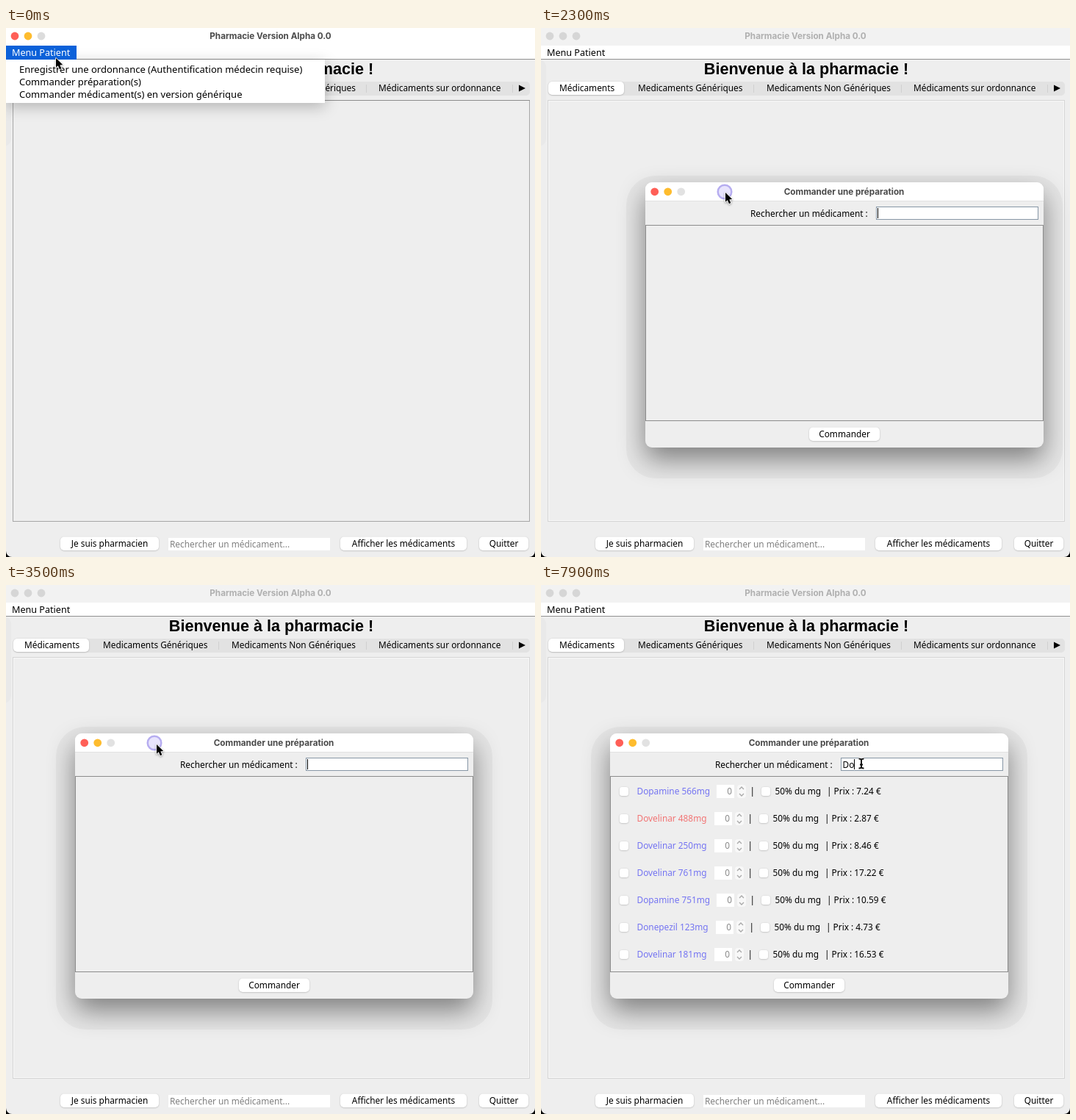
Write an HTML page with a canvas that moves like this. It is 720 by 720 pixels and loops after 8 s.

```html
<!DOCTYPE html>
<html lang="fr">
<head>
<meta charset="utf-8">
<style>
html, body { margin: 0; width: 100%; height: 100%; overflow: hidden; background: #000; }
canvas { display: block; }
</style>
</head>
<body>
<canvas id="stage" width="720" height="720"></canvas>
<script>
const c = document.getElementById('stage').getContext('2d');
const LOOP = 8000, STEP = 100;
const ui = size => `500 ${size}px "Noto Sans", sans-serif`;
const LABEL = ui(11.85), MENU = ui(12.6), ITEM = ui(13), TITLE = 'bold 11.7px Inter, sans-serif';
const BLUE = '#0b61d9', GREY = '#eeeeee';

// Each key is [time, x, y].
const pointerKeys = [[0, 68, 41], [200, 75, 47], [500, 98, 67], [700, 103, 74], [1000, 103, 74],
  [1300, 277, 178], [1700, 414, 224], [1900, 420, 226], [2600, 141, 223], [2800, 144, 222],
  [3500, 205, 217], [3700, 207, 219], [4000, 300, 256], [4300, 405, 268], [4500, 434, 251], [4800, 436, 243]];
const dialogKeys = [[1900, 311, 212], [2600, 32, 208], [2800, 35, 208], [3500, 94, 202]];
const rows = [['Dopamine 566mg', 0, '7.24'], ['Dovelinar 488mg', -3, '2.87'], ['Dovelinar 250mg', -3, '8.46'],
  ['Dovelinar 761mg', -3, '17.22'], ['Dopamine 751mg', 0, '10.59'], ['Donepezil 123mg', -1, '4.73'],
  ['Dovelinar 181mg', -3, '16.53']];
const menuItems = ['Enregistrer une ordonnance (Authentification médecin requise)',
  'Commander préparation(s)', 'Commander médicament(s) en version générique'];

function at(keys, t) {
  const i = keys.findIndex(k => k[0] > t);
  if (i < 0) return keys[keys.length - 1].slice(1);
  if (i === 0) return keys[0].slice(1);
  const [t0, x0, y0] = keys[i - 1], [t1, x1, y1] = keys[i];
  const p = (t - t0) / (t1 - t0), e = p * p * (3 - 2 * p);
  return [Math.round(x0 + (x1 - x0) * e), Math.round(y0 + (y1 - y0) * e)];
}

function rect(x, y, w, h, fill) {
  c.fillStyle = fill;
  c.fillRect(x, y, w, h);
}

function frame(x, y, w, h, color) {
  c.strokeStyle = color;
  c.lineWidth = 1;
  c.strokeRect(x + .5, y + .5, w - 1, h - 1);
}

function rounded(x, y, w, h, r, fill) {
  c.fillStyle = fill;
  c.beginPath();
  c.roundRect(x, y, w, h, r);
  c.fill();
}

function shadowed(color, blur, dy, draw) {
  c.save();
  c.shadowColor = color;
  c.shadowBlur = blur;
  c.shadowOffsetY = dy;
  draw();
  c.restore();
}

function text(s, x, y, color = '#000', font = LABEL, align = 'left') {
  c.font = font;
  c.fillStyle = color;
  c.textAlign = align;
  c.fillText(s, x, y);
}

function raised(x, y, w, h, r = 5) {
  shadowed('rgba(0,0,0,.25)', 2, .5, () => rounded(x, y, w, h, r, '#fff'));
}

function button(label, x, y, w) {
  raised(x, y, w, 18.5);
  text(label, x + w / 2, y + 13, '#000', LABEL, 'center');
}

function lights(x, y, colors) {
  colors.forEach((color, i) => {
    c.fillStyle = color;
    c.beginPath();
    c.arc(x + 18 * i, y, 5.4, 0, 7);
    c.fill();
  });
}

function polygon(points) {
  c.beginPath();
  points.forEach(([x, y]) => c.lineTo(x, y));
  c.closePath();
}

function drawMain(active, paneFocused) {
  rect(0, 0, 720, 720, '#000');
  rounded(0, 0, 720, 720, [0, 0, 8, 8], GREY);
  rect(0, 0, 720, 24, active ? '#fff' : '#f2f2f2');
  text('Pharmacie Version Alpha 0.0', 360, 15, active ? '#4a4a4a' : '#b0b0b0', TITLE, 'center');
  lights(12, 11, active ? ['#ff5f57', '#febc2e', '#dcdcdc'] : Array(3).fill('#d6d6d6'));
  rect(0, 24, 720, 18, '#fff');
  rect(0, 42, 720, 1, '#919191');
  text('Menu Patient', 8, 38, '#000', MENU);
  rounded(-20, 43, 27, 118, 10, '#e9e9e9');
  text('Bienvenue à la pharmacie !', 361, 63, '#000', 'bold 21.6px "Liberation Sans", Arial, sans-serif', 'center');

  rounded(10, 73, 703, 19, 5, '#e2e2e2');
  for (const x of [289, 490, 689]) rect(x, 77, 1, 11, '#d0d0d0');
  raised(10, 73, 103, 18);
  text('Médicaments', 25, 86);
  text('Medicaments Génériques', 132, 86);
  text('Medicaments Non Génériques', 307, 86);
  text('Médicaments sur ordonnance', 507, 86);
  c.fillStyle = '#000';
  polygon([[698, 77.5], [707, 82], [698, 86.5]]);
  c.fill();

  frame(9, 98, 704, 574, paneFocused ? '#a6a6a6' : '#d4d4d4');
  if (paneFocused) rect(9, 98, 704, 1, '#8c8c8c');
  else frame(10, 99, 702, 572, '#f8f8f8');

  button('Je suis pharmacien', 74, 692.5, 134);
  rect(221, 694, 220, 17, '#fff');
  text('Rechercher un médicament...', 223, 707, '#808080');
  button('Afficher les médicaments', 455, 692.5, 172);
  button('Quitter', 644, 692.5, 67);
}

function drawMenu(pointerY) {
  shadowed('rgba(0,0,0,.25)', 20, 5, () => rect(0, 43, 434, 59, '#fff'));
  rect(0, 24, 96, 19, BLUE);
  text('Menu Patient', 8, 38, '#fff', MENU);
  menuItems.forEach((label, i) => {
    const top = 48 + 17 * i, hover = pointerY >= top && pointerY < top + 17;
    if (hover) rect(0, top, 434, 17, BLUE);
    text(label, 18, top + 13, hover ? '#fff' : '#000', ITEM);
  });
}

function drawRow([name, dx, price], i) {
  const y = 79 + 37 * i, base = y + 4;
  raised(13, y - 6, 12, 12, 3);
  text(name, 36.5, base, i === 1 ? '#f27474' : '#7474f2');
  c.save();
  c.translate(dx, 0);
  rect(145, y - 9, 24, 18, '#fff');
  text('0', 166, base, '#8a8a8a', LABEL, 'right');
  rounded(173, y - 9, 12, 18, 4, '#f8f8f8');
  c.strokeStyle = '#a8a8a8';
  c.lineWidth = 1.3;
  for (const s of [-1, 1]) {
    c.beginPath();
    c.moveTo(176, y + 3 * s);
    c.lineTo(179, y + 6 * s);
    c.lineTo(182, y + 3 * s);
    c.stroke();
  }
  text('|', 190.5, base);
  raised(206, y - 6, 12, 12, 3);
  text('50% du mg', 224.5, base);
  text('| Prix : ' + price + ' €', 295, base);
  c.restore();
}

function drawDialog([x, y], focused, typed, caret, filled) {
  c.save();
  c.translate(x, y);
  // Faint outer step of the shadow, then its soft core.
  rounded(-26, -9, 594, 412, 40, 'rgba(0,0,0,.035)');
  shadowed('rgba(0,0,0,.45)', 36, 16, () => rounded(0, 0, 542, 361, 9, GREY));
  rounded(0, 0, 542, 26, [9, 9, 0, 0], '#fff');
  rect(0, 25, 542, 1, '#e2e2e2');
  lights(12.7, 12.8, ['#ff5f57', '#febc2e', '#e2e2e2']);
  text('Commander une préparation', 270.5, 17, '#4a4a4a', TITLE, 'center');
  text('Rechercher un médicament :', 143, 46.5);
  rect(315, 34, 220, 17, '#fff');
  if (focused) frame(314, 33, 221, 18, '#8797a6');
  text(typed, 316.5, 46.5);
  if (caret) rect(316 + Math.round(c.measureText(typed).width), 35, 1, 14, '#000');
  frame(0, 58, 542, 267, '#8c8c8c');
  if (filled) rows.forEach(drawRow);
  button('Commander', 223, 333.5, 96);
  c.restore();
}

function drawPress(x, y) {
  c.beginPath();
  c.arc(x, y, 9.3, 0, 7);
  c.fillStyle = 'rgba(222,216,252,.7)';
  c.fill();
  c.strokeStyle = '#b6adf0';
  c.lineWidth = 2.5;
  c.stroke();
}

function drawPointer(x, y, beam) {
  c.save();
  c.translate(x, y);
  c.lineJoin = 'round';
  if (beam) {
    for (const [color, width] of [['#fff', 3.6], ['#111', 1.9]]) {
      c.strokeStyle = color;
      c.lineWidth = width;
      c.stroke(new Path2D('M-3.5-6.5Q0-6.5 0-4.5V4.5Q0 6.5-3.5 6.5M3.5-6.5Q0-6.5 0-4.5M0 4.5Q0 6.5 3.5 6.5M-2 1.5H2'));
    }
  } else {
    polygon([[0, 0], [0, 12.8], [2.8, 10.2], [5, 15.2], [7.4, 14.1], [5.3, 9.4], [9.2, 9.1]]);
    c.strokeStyle = '#fff';
    c.lineWidth = 1.6;
    shadowed('rgba(0,0,0,.4)', 3, 1, () => c.stroke());
    c.fillStyle = '#000';
    c.fill();
  }
  c.restore();
}

function draw(now) {
  const t = Math.floor(now % LOOP / STEP) * STEP;
  const pointer = at(pointerKeys, t), dialog = at(dialogKeys, t);
  const menuOpen = t < 800, dialogOpen = t >= 900, focused = t >= 1200;
  const blink = t >= 1300 && Math.floor((t - 1300) / 500) % 2 === 0;
  const typed = t < 7100 ? '' : t < 7600 ? 'D' : 'Do';

  drawMain(!dialogOpen, t < 1200);
  if (menuOpen) drawMenu(pointer[1]);
  if (dialogOpen) drawDialog(dialog, focused, typed, typed ? true : blink, t >= 7200);
  if (t === 700) drawPress(...pointer);
  if (t >= 1900 && t < 3700) drawPress(dialog[0] + 108, dialog[1] + 13);
  drawPointer(...pointer, t >= 4500);
}

function tick() {
  draw(performance.now());
  requestAnimationFrame(tick);
}
tick();
</script>
</body>
</html>
```
